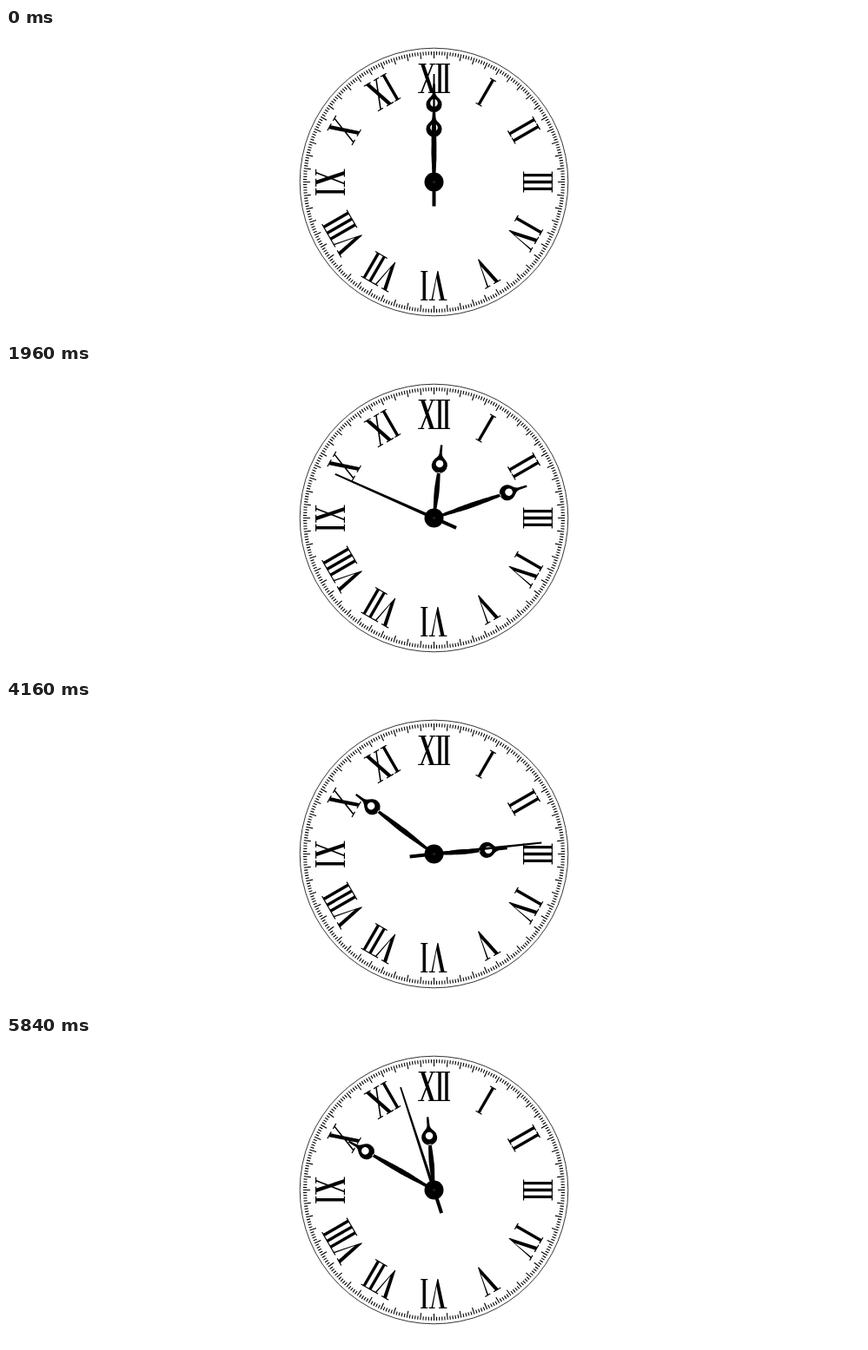
These frames come from a looping animation (985 px wide and 355 px high, 5.88 s). An HTML page:

```html
<!DOCTYPE html>
<html lang="en">
<head>
<meta charset="utf-8">
<title>Clock</title>
<style>
  html, body { margin: 0; width: 100%; height: 100%; overflow: hidden; background: #fff; }
  svg { display: block; width: 985px; height: 355px; }
</style>
</head>
<body>
<svg viewBox="0 0 985 355" role="img" aria-label="Clock with Roman numerals">
  <g transform="translate(492.5 177.5)">
    <circle r="154.3" fill="none" stroke="#000" stroke-width="0.8"/>
    <path id="ticks" stroke="#000" stroke-width="1.1"/>
    <g id="numerals"></g>
    <path id="hour" fill-rule="evenodd"/>
    <path id="minute" fill-rule="evenodd"/>
    <path id="second" d="M-2 28 H2 V0 H1.8 L0.9 -124.5 H-0.9 L-1.8 0 H-2 Z"/>
    <circle r="11"/>
    <circle r="1.5" fill="#222"/>
  </g>
</svg>
<script>
const LOOP = 5880, STEP = 40;
const $ = id => document.getElementById(id);

// Dial: 300 marks, a longer one at every minute
let marks = '';
for (let i = 0; i < 300; i++) {
  const a = i * Math.PI / 150, inner = i % 5 ? 146.3 : 142.5;
  const at = r => `${(r * Math.sin(a)).toFixed(2)} ${(-r * Math.cos(a)).toFixed(2)}`;
  marks += `M${at(150.5)}L${at(inner)}`;
}
$('ticks').setAttribute('d', marks);

// Condensed Roman letters, 34 high, from y = 0 (top) to 34
const serif = (x, y, w) => `M${x - w / 2} ${y}h${w}v1.2h${-w}z`;
const bar = (x0, x1, w) => `M${x0 - w / 2} 0h${w}L${x1 + w / 2} 34h${-w}z`;
const letters = {
  I: { width: 7.9, path: bar(3.95, 3.95, 3.4) + serif(3.95, 0, 8) + serif(3.95, 32.8, 8) },
  V: { width: 21, path: 'M3 0h4.2L12.3 25.5 16.8 0h1.6L11.3 34h-1z' + serif(5, 0, 9.4) + serif(17.6, 0, 6.8) },
  X: { width: 21, path: 'M2.8 0h4.4L18.6 34h-4.4z' + bar(17, 3.6, 1.7)
      + serif(5, 0, 9) + serif(17, 0, 7) + serif(3.6, 32.8, 7) + serif(16.4, 32.8, 9) }
};
const names = 'XII I II III IV V VI VII VIII IX X XI'.split(' ');
$('numerals').innerHTML = names.map((name, hour) => {
  const gap = name.length === 2 ? 1.5 : 0;
  let x = 0, glyphs = '';
  for (const c of name) {
    glyphs += `<path transform="translate(${x})" d="${letters[c].path}"/>`;
    x += letters[c].width + gap;
  }
  return `<g transform="rotate(${hour * 30}) translate(${-(x - gap) / 2} -136.5)">${glyphs}</g>`;
}).join('');

// Leaf blade, ring with a hole, pointed neck
function handPath(ring, tip) {
  const mid = -ring * 0.5, end = -ring + 8;
  return `M-1.4 0C-1.8 ${mid * 0.5} -2.9 ${mid * 0.7} -2.9 ${mid}S-1.6 ${end - 4} -1.4 ${end}`
    + `H1.4C1.6 ${end - 4} 2.9 ${mid * 1.3} 2.9 ${mid}S1.8 ${mid * 0.5} 1.4 0Z`
    + `M-1.2 ${-tip}H1.2L1.5 ${-ring - 14}C2 ${-ring - 10} 4.5 ${-ring - 8.8} 6.4 ${-ring - 6.4}`
    + `A9.05 9.05 0 1 1 -6.4 ${-ring - 6.4}C-4.5 ${-ring - 8.8} -2 ${-ring - 10} -1.5 ${-ring - 14}Z`
    + `M-4.3 ${-ring - 1.8}a4.3 4.3 0 1 0 8.6 0a4.3 4.3 0 1 0 -8.6 0Z`;
}
$('hour').setAttribute('d', handPath(61, 84.5));
$('minute').setAttribute('d', handPath(89.3, 113));

// Clock seconds grow as n³ times a slowly rising factor, smooth in its logarithm
const keys = [[19, 36], [31, 164], [49, 709], [73, 2708], [91, 6017], [116, 16235], [146, 42597]]
  .map(([n, s]) => [n, Math.log(s / n ** 3)]);
keys.unshift([0, Math.log(0.00494)]);
const rise = i => (keys[i + 1][1] - keys[i][1]) / (keys[i + 1][0] - keys[i][0]);
const slopes = keys.map((key, i) => {
  if (i === 0) return rise(0);
  if (i === keys.length - 1) return rise(i - 1);
  const before = key[0] - keys[i - 1][0], after = keys[i + 1][0] - key[0];
  return (rise(i - 1) * after + rise(i) * before) / (before + after);
});

function clockSeconds(n) {
  let i = 0;
  while (i < keys.length - 2 && n > keys[i + 1][0]) i++;
  const [n0, y0] = keys[i], [n1, y1] = keys[i + 1];
  const w = n1 - n0, u = (n - n0) / w, v = 1 - u;
  const y = v * v * (1 + 2 * u) * y0 + u * u * (3 - 2 * u) * y1
    + u * v * w * (v * slopes[i] - u * slopes[i + 1]);
  return Math.round(n ** 3 * Math.exp(y));
}

const turn = (id, degrees) => $(id).setAttribute('transform', `rotate(${degrees % 360})`);

function draw(time) {
  const s = clockSeconds(Math.floor((time % LOOP) / STEP));
  turn('hour', s / 120);
  turn('minute', s / 10);
  turn('second', s * 6);
}

const start = performance.now();
function tick() {
  draw(performance.now() - start);
  requestAnimationFrame(tick);
}
tick();
</script>
</body>
</html>
```
